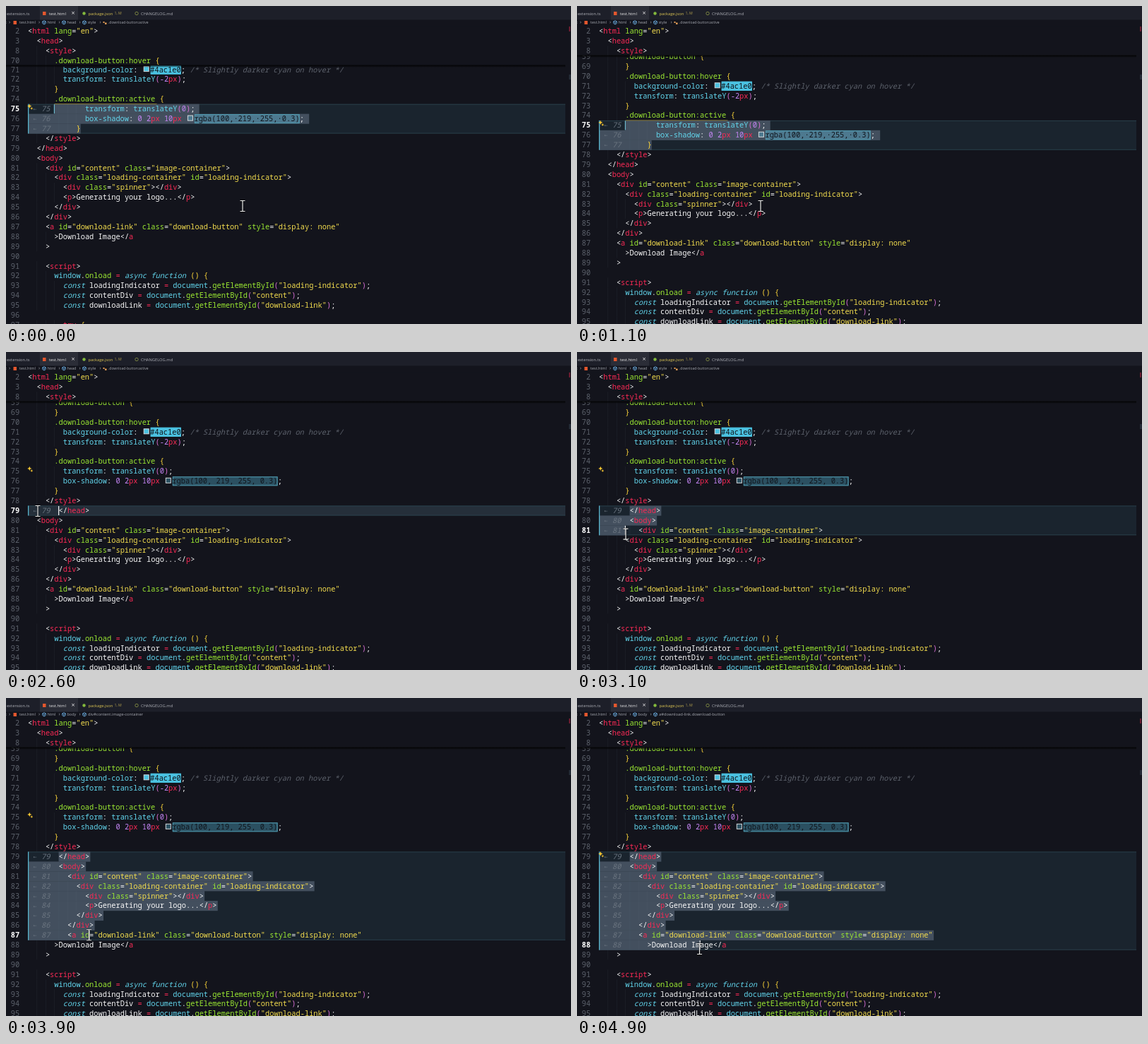
Recreate the animation shown at these times as an HTML page with a canvas. Size 800 by 450 pixels, loop 5 s.

```html
<!DOCTYPE html>
<html lang="en">
<head>
<meta charset="utf-8">
<style>
html, body { margin: 0; width: 100%; height: 100%; overflow: hidden; background: #13141c; }
canvas { display: block; width: 800px; height: 450px; }
</style>
</head>
<body>
<canvas id="stage" width="800" height="450"></canvas>
<script>
const ctx = document.getElementById("stage").getContext("2d");
const MONO = '"Noto Sans Mono", monospace', UI = '"Open Sans", sans-serif';
const CHAR = 6.222, ROW = 13.9, LEFT = 31, SHIFT = 5;
const BG = "#13141c", WHITE = "#f8f8f8", RED = "#f92a55", GREEN = "#9be832", YELLOW = "#f2dc4e",
  CYAN = "#62d5ec", PURPLE = "#c586f5", GOLD = "#ffd83a", ORCHID = "#da70d6", GREY = "#5d626c", DARK = "#10151c";

// Syntax rules: pattern, colour, italic
const rules = {
  html: [[/"[^"]*"/y, YELLOW], [/(?<=<\/?)\w+/y, RED], [/[\w-]+(?==")/y, GREEN]],
  css: [[/\/\*.*\*\//y, GREY, true], [/\.[\w-]+(:\w+)?(?= \{)/y, GREEN], [/#\w{6}|rgba\([^)]*\)/y, DARK],
    [/[\w-]+(?=:)|translateY/y, CYAN], [/-?\d+/y, PURPLE], [/px/y, RED], [/[{}]/y, GOLD], [/[()]/y, ORCHID]],
  js: [[/"[^"]*"/y, YELLOW], [/const|async|function/y, CYAN, true], [/document|window/y, CYAN],
    [/getElementById|onload/y, GREEN], [/=|try/y, RED], [/\(\)|[{}]/y, GOLD], [/[()]/y, ORCHID]]
};

// Line number, language, indent, text
const sticky = [
  [2, "html", 0, '<html lang="en">'],
  [3, "html", 2, "<head>"],
  [8, "html", 4, "<style>"]
];
const lines = [
  [59, "css", 6, ".download-button {"],
  [69, "css", 6, "}"],
  [70, "css", 6, ".download-button:hover {"],
  [71, "css", 8, "background-color:   #4ac1e0; /* Slightly darker cyan on hover */"],
  [72, "css", 8, "transform: translateY(-2px);"],
  [73, "css", 6, "}"],
  [74, "css", 6, ".download-button:active {"],
  [75, "css", 8, "transform: translateY(0);"],
  [76, "css", 8, "box-shadow: 0 2px 10px   rgba(100, 219, 255, 0.3);"],
  [77, "css", 6, "}"],
  [78, "html", 4, "</style>"],
  [79, "html", 2, "</head>"],
  [80, "html", 2, "<body>"],
  [81, "html", 4, '<div id="content" class="image-container">'],
  [82, "html", 6, '<div class="loading-container" id="loading-indicator">'],
  [83, "html", 8, '<div class="spinner"></div>'],
  [84, "html", 8, "<p>Generating your logo...</p>"],
  [85, "html", 6, "</div>"],
  [86, "html", 4, "</div>"],
  [87, "html", 4, '<a id="download-link" class="download-button" style="display: none"'],
  [88, "html", 6, ">Download Image</a"],
  [89, "html", 4, ">"],
  [90, "html", 0, ""],
  [91, "html", 4, "<script>"],
  [92, "js", 6, "window.onload = async function () {"],
  [93, "js", 8, 'const loadingIndicator = document.getElementById("loading-indicator");'],
  [94, "js", 8, 'const contentDiv = document.getElementById("content");'],
  [95, "js", 8, 'const downloadLink = document.getElementById("download-link");'],
  [96, "js", 0, ""],
  [97, "js", 8, "try {"]
];

// Pointer keys: time, x, y
const path = [[0, 335, 283], [600, 335, 283], [1100, 260, 283], [1700, 70, 238], [2300, 45, 225],
  [2800, 45, 225], [3500, 101, 301], [3600, 104, 312], [4000, 122, 343], [4300, 127, 344],
  [4800, 173, 355], [5000, 174, 355]];

const clamp = (v, a, b) => Math.max(a, Math.min(b, v));
const colX = col => LEFT + col * CHAR;

function rect(x, y, w, h, color) {
  ctx.fillStyle = color;
  ctx.fillRect(x, y, w, h);
}

function text(s, x, y, color, font) {
  ctx.font = font;
  ctx.fillStyle = color;
  ctx.fillText(s, x, y);
}

function code(s, x, mid, color, style = "500") {
  text(s, x, mid + 3.4, color, `${style} 10.37px ${MONO}`);
}

function pointer(t) {
  const i = path.findIndex(k => k[0] > t);
  const [a, b] = [path[i - 1], path[i]];
  const k = (t - a[0]) / (b[0] - a[0]);
  return [a[1] + (b[1] - a[1]) * k, a[2] + (b[2] - a[2]) * k];
}

function tokens(lang, s) {
  const out = [];
  for (let i = 0; i < s.length;) {
    let hit = null;
    for (const [re, color, italic] of rules[lang]) {
      re.lastIndex = i;
      const m = re.exec(s);
      if (m) { hit = { i, s: m[0], color, italic }; break; }
    }
    hit = hit || { i, s: s[i], color: WHITE };
    out.push(hit);
    i += hit.s.length;
  }
  return out;
}

function colorBox(s, x, mid) {
  const hex = s[0] === "#", w = s.length * CHAR;
  const fill = hex ? s : "rgba(100,219,255,.3)";
  rect(x + 0.5, mid - 6.5, w - 0.5, 13, fill);
  rect(x - 9, mid - 4.5, 7, 7, fill);
  ctx.lineWidth = 1;
  ctx.strokeStyle = hex ? "#4ac1e0" : "#4f9bb0";
  ctx.strokeRect(x + 1, mid - 6, w - 1.5, 12);
  ctx.strokeStyle = "#d4dadd";
  ctx.strokeRect(x - 9, mid - 4.5, 7, 7);
}

function codeLine([num, lang, indent, s], mid, marked, active, dots) {
  code(num, 19.3 - String(num).length * CHAR, mid, active ? WHITE : GREY, active ? "bold" : "400");
  if (marked) {
    text("←", 38.5, mid + 2.5, "#6b7580", `6px "DejaVu Sans", sans-serif`);
    code(num, 50, mid, "#6b7580", "italic");
  }
  const pad = marked ? SHIFT : 0;
  for (let col = 2; col < indent; col += 2) rect(colX(col + pad), mid - ROW / 2, 0.7, ROW, "rgba(120,130,150,.13)");
  let swatch = 0;
  for (const k of tokens(lang, s)) {
    if (k.color === DARK) swatch = 1;
    const x = colX(indent + pad + k.i) - swatch;
    if (k.color === DARK) colorBox(k.s, x, mid);
    code(dots && k.color === DARK ? k.s.replace(/ /g, "·") : k.s, x, mid, k.color, k.italic ? "italic" : "500");
  }
}

function selection(t, [px, py]) {
  if (t < 2500) return { from: 75, fromCol: 6, to: 77, toCol: 12, active: 75, caret: 6, eol: 1 };
  const row = clamp(79 + Math.floor((py - 2.5 - 217.5) / ROW), 79, 88);
  const col = row === 79 ? 7 : Math.max(SHIFT, Math.round((px - LEFT) / CHAR));
  return { from: 79, fromCol: 7, to: row, toCol: col, active: row, caret: col, eol: 0.2 };
}

function dot(x, y, color, r = 2.2) {
  ctx.fillStyle = color;
  ctx.beginPath();
  ctx.arc(x, y, r, 0, 7);
  ctx.fill();
}

function ring(x, y, color) {
  ctx.strokeStyle = color;
  ctx.lineWidth = 0.7;
  ctx.beginPath();
  ctx.arc(x, y, 2.2, 0, 7);
  ctx.stroke();
}

function cube(x, y) {
  ctx.strokeStyle = "#6fb3e8";
  ctx.lineWidth = 0.8;
  ctx.beginPath();
  for (let i = 0; i < 6; i++) ctx.lineTo(x + 2.7 * Math.sin(i * Math.PI / 3), y + 2.7 * Math.cos(i * Math.PI / 3));
  ctx.closePath();
  ctx.moveTo(x - 2.3, y - 1.3);
  ctx.lineTo(x, y);
  ctx.lineTo(x + 2.3, y - 1.3);
  ctx.moveTo(x, y);
  ctx.lineTo(x, y + 2.7);
  ctx.stroke();
}

function header(t) {
  const tab = `5.75px ${UI}`, crumb = `5.5px ${UI}`, dim = "#a6a9b1";
  rect(0, 0, 800, 28.4, BG);
  rect(0, 0, 800, 19.5, "#1d1f29");
  rect(48, 0, 54, 19.5, "#2b2d37");
  text("extension.ts", 1, 12.5, "#b0b2b9", tab);
  rect(52, 8, 4.5, 5, "#e4572e");
  text("test.html", 61, 12.5, "#e8e8e8", tab);
  text("×", 92.5, 13.4, "#e8e8e8", `9px ${UI}`);
  dot(110.5, 10.5, "#83b93c");
  text("package.json", 116.5, 12.5, "#dcc653", tab);
  text("1, M", 153.5, 12.3, "#b3a04e", `5.2px ${UI}`);
  ring(185, 10.5, "#9aa64a");
  text("CHANGELOG.md", 191, 12.5, "#b0b2b9", tab);

  const inBody = t >= 3900;
  text(":", 0, 25.3, dim, crumb);
  for (const x of [4, 46, 74.5, 103.5].concat(inBody ? [] : 132.5)) text("›", x, 25.2, dim, `7px ${UI}`);
  rect(10.5, 21, 4.5, 5, "#e4572e");
  text("test.html", 19, 25.3, dim, crumb);
  for (const x of [54, 82, 111]) cube(x, 23.3);
  text("html", 58.5, 25.3, dim, crumb);
  text(inBody ? "body" : "head", 86.5, 25.3, dim, crumb);
  if (inBody) {
    text(t < 4700 ? "div#content.image-container" : "a#download-link.download-button", 116, 25.3, dim, `5.8px ${UI}`);
  } else {
    text("style", 115.5, 25.3, dim, crumb);
    rect(137.5, 22, 2, 2, "#e09a55");
    rect(140, 23.5, 2.5, 2.5, "#e09a55");
    text(".download-button:active", 145, 25.3, dim, `5px ${UI}`);
  }
}

function sparkle(x, y, r) {
  ctx.fillStyle = "#ffcc32";
  ctx.beginPath();
  for (let i = 0; i < 8; i++) {
    const d = i % 2 ? r * 0.4 : r;
    ctx.lineTo(x + d * Math.sin(i * Math.PI / 4), y - d * Math.cos(i * Math.PI / 4));
  }
  ctx.fill();
}

function beam([x, y]) {
  const shape = () => {
    ctx.beginPath();
    ctx.moveTo(x - 3.5, y - 7.5);
    ctx.lineTo(x + 3.5, y - 7.5);
    ctx.moveTo(x, y - 7.5);
    ctx.lineTo(x, y + 7.5);
    ctx.moveTo(x - 3.5, y + 7.5);
    ctx.lineTo(x + 3.5, y + 7.5);
    ctx.stroke();
  };
  ctx.strokeStyle = "rgba(0,0,0,.6)";
  ctx.lineWidth = 2.4;
  shape();
  ctx.strokeStyle = "#eeeeee";
  ctx.lineWidth = 1.2;
  shape();
}

function draw(t) {
  const scroll = 23.2 * (1 - (1 - clamp(t / 400, 0, 1)) ** 3);
  const rowY = i => 76.2 + scroll + (i - 2) * ROW;
  const lineY = n => rowY(n - 68);
  const mouse = pointer(t), sel = selection(t, mouse);
  const selecting = t < 2500 || sel.to > sel.from;

  rect(0, 0, 800, 450, BG);

  // Marked rows
  const top = lineY(sel.from) - ROW / 2, high = (sel.to - sel.from + 1) * ROW;
  rect(LEFT, top, 761, high, selecting ? "#1a242e" : "#252f3a");
  rect(LEFT, top, 761, 0.8, "#2c4651");
  rect(LEFT, top + high - 0.8, 761, 0.8, "#2c4651");
  if (selecting) {
    for (let n = sel.from; n <= sel.to; n++) {
      const [, , indent, s] = lines[n - 68];
      const a = colX(n === sel.from ? sel.fromCol : 0);
      const b = colX(n === sel.to ? sel.toCol : indent + s.length + SHIFT + sel.eol);
      rect(a, lineY(n) - ROW / 2, b - a, ROW + 0.2, "#434f5e");
    }
  }
  rect(LEFT, top, 1.3, high, "#58b4cc");
  if (t < 2500) rect(68.5, top - 0.5, 145, 0.8, "rgba(255,216,58,.55)");

  lines.forEach((line, i) => {
    const marked = line[0] >= sel.from && line[0] <= sel.to;
    codeLine(line, rowY(i), marked, line[0] === sel.active, marked && selecting);
  });
  rect(colX(sel.caret) - 0.5, lineY(sel.active) - 6.5, 1.2, 13, t < 2500 ? "#6fb9cc" : WHITE);

  const bulb = lineY(t < 4800 ? 75 : 79) - 3;
  sparkle(33.3, bulb - 1, 3.2);
  sparkle(36.3, bulb + 2.2, 2);

  // Sticky scopes
  const pinned = rowY(2) < 77 ? [...sticky, lines[2]] : sticky;
  const end = 28.4 + pinned.length * ROW;
  rect(0, 28, 792, end - 28, BG);
  pinned.forEach((line, i) => codeLine(line, 35.4 + i * ROW, false, false, false));
  const shadow = ctx.createLinearGradient(0, end - 0.4, 0, end + 3);
  shadow.addColorStop(0, "rgba(0,0,0,.9)");
  shadow.addColorStop(1, "rgba(0,0,0,0)");
  rect(0, end - 0.4, 792, 3.4, shadow);

  rect(797, 29, 2, 7, "#6b1c30");
  rect(797, t < 2500 ? 97 : 102, 3, 7, "#232a35");
  header(t);
  beam(mouse);
}

const began = performance.now();
function frame() {
  const t = (performance.now() - began) % 5000;
  draw(Math.floor(t / 100) * 100);
  requestAnimationFrame(frame);
}
frame();
</script>
</body>
</html>
```
